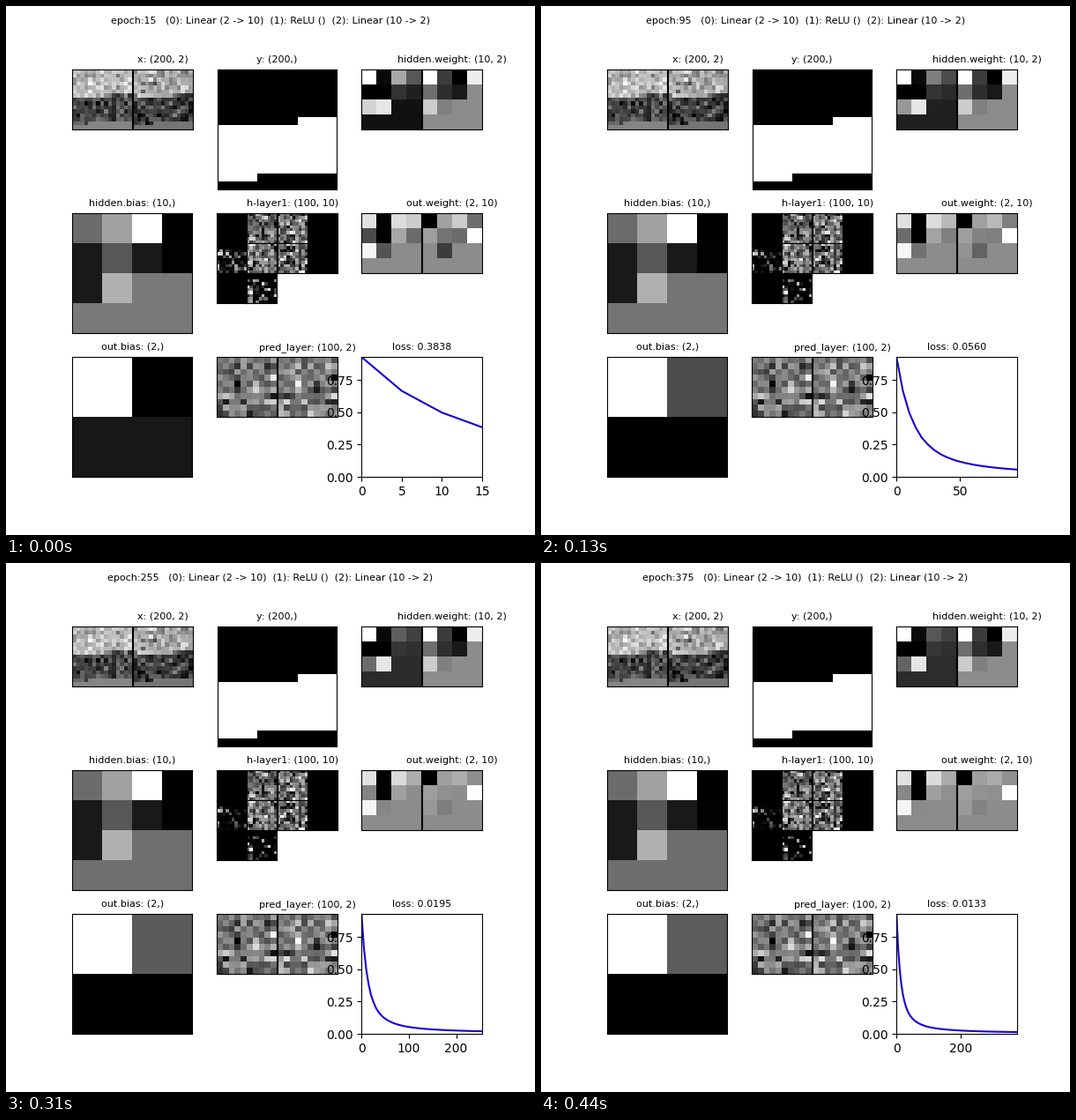
Write a matplotlib script that moves like this. It is 600 by 600 pixels and loops after 500 ms.

```python
import math

import numpy as np
import matplotlib.pyplot as plt
from matplotlib.animation import FuncAnimation

TICK, LOOP = 10, 500

# When each training snapshot appears (ms) and the epoch it shows
STARTS = [0, 60, 130, 190, 250, 310, 380, 440]
EPOCHS = [15, 25, 95, 135, 195, 255, 315, 375]
LOSSES = {0: 0.927, 5: 0.665, 10: 0.497, 15: 0.3838, 25: 0.2473,
          95: 0.0560, 135: 0.0382, 255: 0.0195, 375: 0.0133}
PAD = 0.55

rng = np.random.default_rng(7)


def settle(epoch, pace=110):
    """Share of the way the weights have moved to their final values."""
    return 1 - math.exp(-(epoch - EPOCHS[0]) / pace)


def relax(percent, goal, epoch):
    """Middle levels drift towards the goal, extreme ones stay put."""
    level = np.array(percent) / 100
    middle = (level > 0.05) & (level < 0.85)
    return level + middle * (goal - level) * 0.75 * settle(epoch)


def square(values, pad):
    """Flat values laid out row by row in a padded square."""
    side = math.ceil(math.sqrt(len(values)))
    cells = np.full(side * side, pad, float)
    cells[:len(values)] = values
    return cells.reshape(side, side)


def loss(epoch):
    """Power-law decay through the known losses."""
    keys = np.log(np.array(list(LOSSES)) + 5)
    logs = np.log(list(LOSSES.values()))
    return np.exp(np.interp(np.log(epoch + 5), keys, logs))


# Fixed batches of noise
def two_classes(high, low):
    return np.concatenate([rng.normal(high, 0.12, 100),
                           rng.normal(low, 0.13, 100)])


inputs = [square(two_classes(0.75, 0.30), 0.52),
          square(two_classes(0.67, 0.24), 0.46)]
active = rng.normal(0.43, 0.23, (10, 10, 10))
faint = rng.random((10, 10, 10))
faint[:, :2] = 0
logits = rng.normal(0.47, 0.18, (10, 10))


# Each panel gives its list of grey images for an epoch
def x_data(epoch):
    return inputs


def y_data(epoch):
    return [square(np.repeat([0, 1], 100), 0)]


def hidden_weight(epoch):
    first = relax([100, 4, 66, 34, 0, 0, 20, 13, 83, 90, 7], 0.22, epoch)
    second = relax([100, 24, 0, 93, 43, 18, 10, 55, 80, 50], PAD, EPOCHS[0])
    return [square(first[:10], first[10]), square(second, PAD)]


def hidden_bias(epoch):
    levels = relax([42, 63, 100, 0, 10, 34, 10, 1, 10, 69], 0, EPOCHS[0])
    return [square(levels, 0.48 - 0.05 * settle(epoch))]


def h_layer(epoch):
    fade = 5 + 7 * settle(epoch)
    tiles = []
    for i in range(10):
        if i % 4 in (1, 2) and i < 8:
            tiles.append(active[i])
        else:
            tiles.append(faint[i] ** fade * (i in (4, 9)))
    return tiles


def out_weight(epoch):
    first = relax([88, 0, 86, 80, 30, 0, 65, 42, 96, 33], 0.62, epoch)
    second = relax([0, 63, 80, 43, 62, 45, 42, 100, 55, 24], 0.62, epoch)
    return [square(first, PAD), square(second, PAD)]


def out_bias(epoch):
    cells = np.array([[1, 0.46 * settle(epoch, 40) - 0.1], [0, 0]])
    return [(cells - cells.min()) / np.ptp(cells)]


def pred_layer(epoch):
    spread = 1 + 0.1 * settle(epoch)
    gap = (logits - 0.47) * spread
    return [0.47 + gap, 0.47 - gap]


fig = plt.figure(figsize=(6, 6), dpi=100, facecolor="white")
grid = fig.add_gridspec(3, 3)


def panel(spot, title, make):
    """Square grid of image tiles; the title sits on the middle of the top row."""
    tiles = make(EPOCHS[0])
    side = math.ceil(math.sqrt(len(tiles)))
    cells = grid[spot].subgridspec(side, side, wspace=0, hspace=0)
    images = []
    for i, tile in enumerate(tiles):
        ax = fig.add_subplot(cells[i // side, i % side])
        ax.set(xticks=[], yticks=[])
        images.append(ax.imshow(tile, cmap="gray", vmin=0, vmax=1,
                                interpolation="nearest"))
        if i == side // 2:
            ax.set_title(title, fontsize=8)
    return images, make


panels = [panel(spot, title, make) for spot, (title, make) in enumerate([
    ("x: (200, 2)", x_data),
    ("y: (200,)", y_data),
    ("hidden.weight: (10, 2)", hidden_weight),
    ("hidden.bias: (10,)", hidden_bias),
    ("h-layer1: (100, 10)", h_layer),
    ("out.weight: (2, 10)", out_weight),
    ("out.bias: (2,)", out_bias),
    ("pred_layer: (100, 2)", pred_layer),
])]

plot = fig.add_subplot(grid[8])
curve, = plot.plot([], [], color="#1400d8")
plot.set_ylim(0, LOSSES[0])
heading = fig.suptitle("", fontsize=8)


def update(n):
    step = np.searchsorted(STARTS, n * TICK, side="right") - 1
    epoch = EPOCHS[step]
    for images, make in panels:
        for image, tile in zip(images, make(epoch)):
            image.set_data(tile)
    epochs = np.arange(0, epoch + 1, 5)
    curve.set_data(epochs, loss(epochs))
    plot.set_xlim(0, epoch)
    plot.set_title(f"loss: {loss(epoch):.4f}", fontsize=8)
    heading.set_text(f"epoch:{epoch}   (0): Linear (2 -> 10)  "
                     "(1): ReLU ()  (2): Linear (10 -> 2)")
    return []


anim = FuncAnimation(fig, update, frames=LOOP // TICK, interval=TICK,
                     repeat=True, repeat_delay=0)
plt.show()
```
